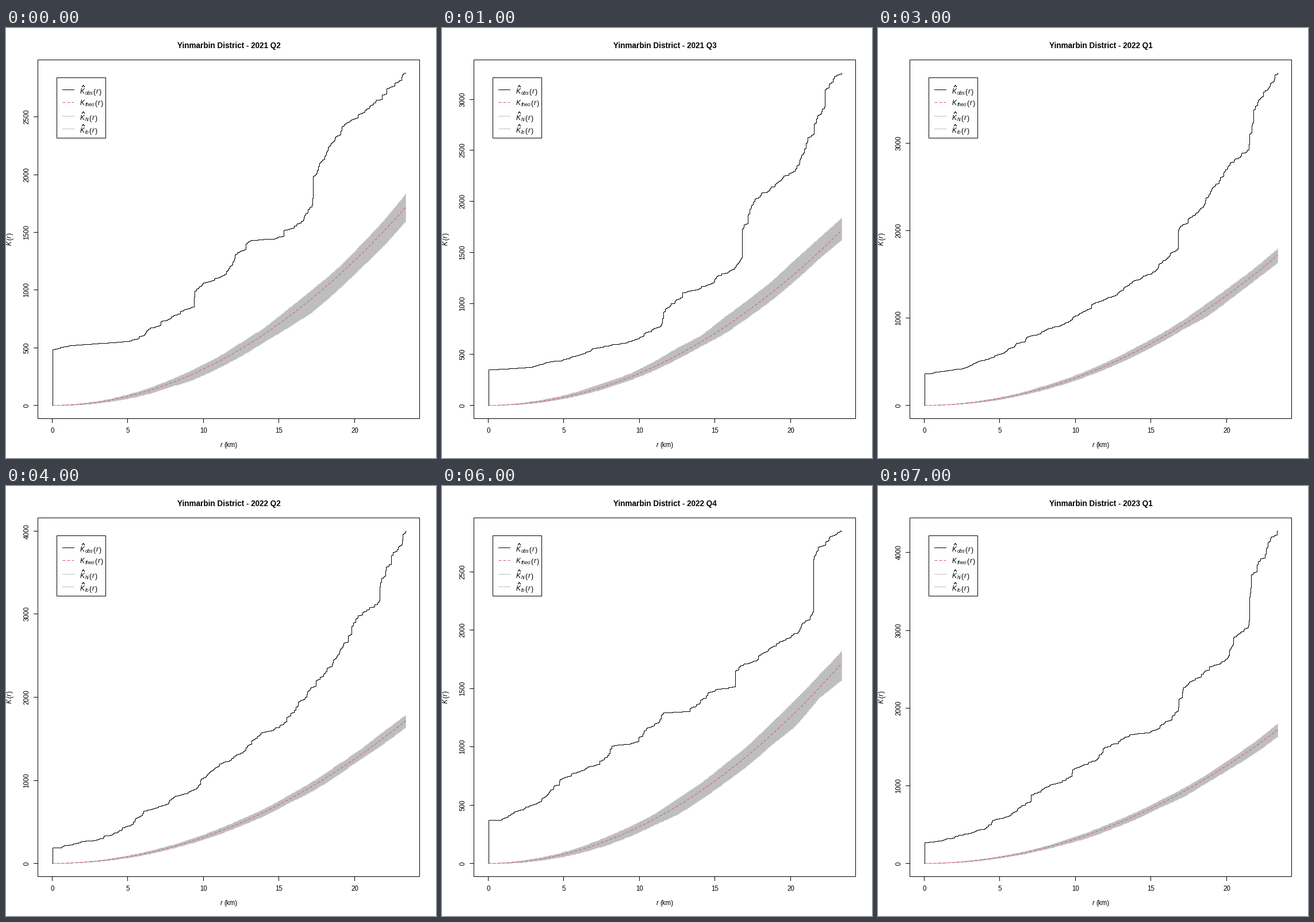
These frames come from a looping animation (748 by 748 pixels, 8000 ms). A matplotlib script:

```python
import numpy as np
import matplotlib
import matplotlib.pyplot as plt
from matplotlib.animation import FuncAnimation
from matplotlib.patches import Polygon, Rectangle

SIZE, DPI = 748, 72
X0, KM, R_MAX = 79.5, 26.32, 23.4   # pixel of r = 0, pixels per km, last r
Y0, SPAN = 656, 578                 # pixel of K = 0, height of the tallest curve
RED, GREY = "#df536b", "#bebebe"

matplotlib.rcParams["font.family"] = "Liberation Sans"

X = np.arange(80, 696)
R = (X - X0) / KM


def stairs(start, bends, seed):
    """Jump to the start height, then climb through the bends in uneven steps."""
    rng = np.random.default_rng(seed)
    rise = np.cumsum(rng.gamma(0.3, size=len(X)) + 0.03)
    y = np.full(len(X), float(Y0))
    points = [(81, start), *bends, (695, Y0 - SPAN)]
    for (xa, ya), (xb, yb) in zip(points, points[1:]):
        part = rise[xa - 80:xb - 79]
        share = (part - part[0]) / (part[-1] - part[0])
        y[xa - 80:xb - 79] = ya + (yb - ya) * share
    return y


def theory(top):
    return Y0 - np.pi * R ** 2 * SPAN / top


def edge(top, width, rng):
    """One side of the envelope: it widens with r, wavers and moves in steps."""
    knots = np.linspace(80, 695, 16)
    waver = np.interp(X, knots, rng.normal(1, 0.1, len(knots)))
    y = theory(top) - width * (R / R_MAX) ** 1.25 * waver
    return np.minimum.accumulate(np.round(np.repeat(y[::3], 3)[:len(X)]))


def quarter(name, top, step, up, down, start, bends):
    return dict(name=name, top=top, step=step, up=up, down=down,
                obs=stairs(start, bends, top))


def between(name, top, step, a, b):
    mid = {k: (a[k] + b[k]) / 2 for k in ("obs", "up", "down")}
    return dict(name=name, top=top, step=step, **mid)


q2_21 = quarter("2021 Q2", 2881, 500, 21, 27, 559, [
    (209, 545), (262, 519), (326, 485), (328, 457), (376, 431), (418, 375),
    (426, 369), (463, 367), (502, 344), (532, 307), (534, 258), (562, 205),
    (597, 163), (646, 125)])
q3_21 = quarter("2021 Q3", 3257, 500, 25, 15, 594, [
    (142, 591), (217, 575), (264, 557), (328, 545), (378, 520), (391, 487),
    (418, 460), (462, 446), (521, 399), (522, 349), (547, 296), (606, 252),
    (645, 185), (667, 107)])
q4_21 = quarter("2021 Q4", 3635, 1000, 13, 12, 573, [
    (137, 569), (211, 543), (253, 530), (264, 513), (365, 489), (384, 472),
    (415, 467), (473, 436), (521, 401), (522, 337), (558, 316), (581, 273),
    (644, 218), (646, 166), (652, 163), (653, 124)])
q2_22 = quarter("2022 Q2", 4000, 1000, 12, 11, 629, [
    (96, 629), (165, 613), (212, 591), (264, 559), (326, 528), (340, 509),
    (414, 461), (456, 426), (473, 420), (521, 367), (560, 316), (598, 259),
    (613, 225), (645, 206), (653, 160)])
q4_22 = quarter("2022 Q4", 2850, 500, 25, 28, 581, [
    (98, 581), (138, 563), (180, 540), (214, 506), (286, 472), (296, 452),
    (325, 449), (385, 394), (430, 392), (480, 353), (509, 349), (511, 320),
    (547, 303), (616, 256), (645, 219), (646, 127), (654, 106)])
q1_23 = quarter("2023 Q1", 4277, 1000, 10, 11, 620, [
    (106, 617), (195, 589), (238, 566), (266, 537), (330, 508), (341, 491),
    (379, 476), (396, 454), (430, 436), (474, 427), (521, 391), (523, 371),
    (563, 327), (603, 303), (644, 242), (646, 193), (654, 150)])

QUARTERS = [q2_21, q3_21, q4_21,
            between("2022 Q1", 3800, 1000, q4_21, q2_22), q2_22,
            between("2022 Q3", 3400, 500, q2_22, q4_22), q4_22, q1_23]


def band(q):
    rng = np.random.default_rng(q["top"])
    high = edge(q["top"], q["up"], rng)
    low = edge(q["top"], -q["down"], rng)
    return np.r_[np.c_[X, high], np.c_[X, low][::-1]]


fig = plt.figure(figsize=(SIZE / DPI, SIZE / DPI), dpi=DPI, facecolor="white")
ax = fig.add_axes([0, 0, 1, 1])
# whole numbers are pixel centres
ax.set(xlim=(-0.5, SIZE - 0.5), ylim=(SIZE - 0.5, -0.5))
ax.axis("off")


def line(xs, ys, color="black", **kw):
    kw = {"lw": 1, "snap": False, "solid_capstyle": "projecting",
          "solid_joinstyle": "miter", **kw}
    return ax.plot(xs, ys, color=color, **kw)[0]


def text(x, y, s, size=11.5, **kw):
    kw = {"ha": "left", "va": "baseline", "rotation_mode": "anchor", **kw}
    return ax.text(x, y, s, fontsize=size, **kw)


def frame(x, y, w, h):
    ax.add_patch(Rectangle((x, y), w, h, fill=False, lw=1, ec="black",
                           snap=False, zorder=4))


dashes = dict(linestyle=(0, (5, 3)), dash_capstyle="butt")
envelope = ax.add_patch(Polygon([(0, 0), (1, 1), (0, 1)], fc=GREY, ec=GREY,
                                lw=0.5, snap=False))
observed = line([], [], drawstyle="steps-post", zorder=3)
expected = line([], [], RED, zorder=3, **dashes)
title = text(387, 34, "", 13.5, weight="bold", ha="center")
yticks = line([], [])
ylabels = [text(39, 0, "", rotation=90, ha="center") for _ in range(8)]

# axes
frame(55, 55, 664, 624)
for r in range(0, 21, 5):
    x = round(X0 + KM * r)
    line([x, x], [679, 686])
    text(x, 704, str(r), ha="center")
text(372, 729, "r", style="italic")
text(379, 729, "(km)")
for y, part, style in ((378, "K", "italic"), (369, "(", "normal"),
                       (364.5, "r", "italic"), (359.5, ")", "normal")):
    text(9.5, y, part, style=style, rotation=90)

# legend
frame(88, 86, 85, 105)
for y, base, sub, after, color, hat in (
        (107, 114, "obs", 151, "black", True),
        (129, 134, "theo", 154, RED, False),
        (153, 160, "hi", 144, GREY, True),
        (175, 182, "lo", 144, GREY, True)):
    line([98, 118], [y, y], color, **({} if hat else dashes))
    text(128.5, base, "K", 12, style="italic")
    text(137, base + 2, sub, 8.5, style="italic")
    text(after, base, "(", 12)
    text(after + 5, base, "r", 12, style="italic")
    text(after + 10, base, ")", 12)
    if hat:
        line([132, 134, 136], [base - 12, base - 15, base - 12], lw=1.2)


def update(i):
    q = QUARTERS[i]
    title.set_text("Yinmarbin District - " + q["name"])
    observed.set_data(X, np.round(q["obs"]))
    expected.set_data(X, theory(q["top"]))
    envelope.set_xy(band(q))
    values = np.arange(0, q["top"] + 1, q["step"])
    ys = np.round(Y0 - values * SPAN / q["top"])
    yticks.set_data(np.tile([48, 55, np.nan], len(ys)), np.repeat(ys, 3))
    for k, label in enumerate(ylabels):
        shown = k < len(ys)
        label.set_visible(shown)
        if shown:
            label.set_text(str(values[k]))
            label.set_y(ys[k])
    return []


anim = FuncAnimation(fig, update, frames=len(QUARTERS), interval=1000,
                     repeat=True, repeat_delay=0, blit=False)
plt.show()
```
